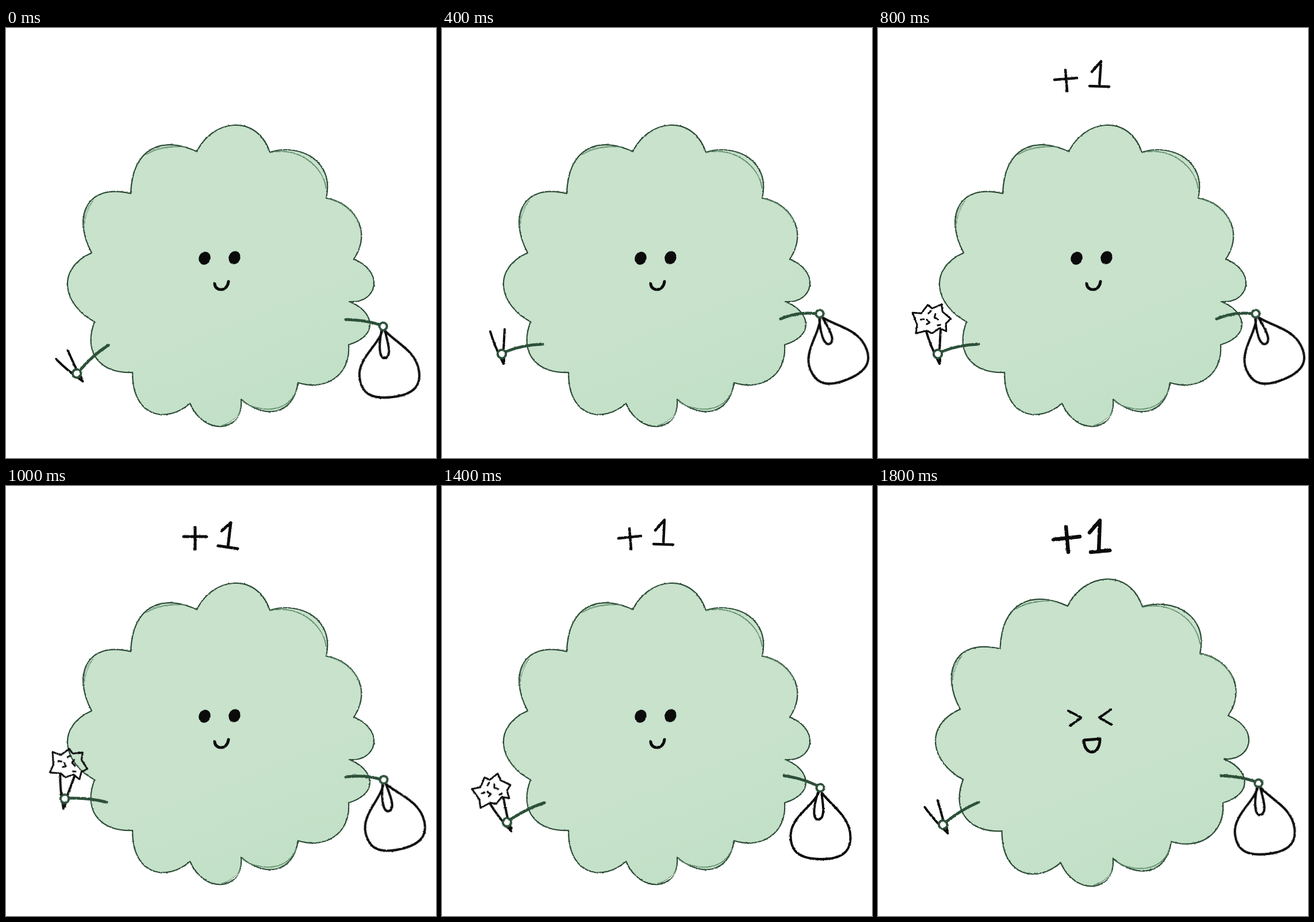
Animation of 748x748 px, one loop 2000 ms. Source, as an HTML page:

```html
<!DOCTYPE html>
<html lang="en">
<head>
<meta charset="utf-8">
<title>Plus one</title>
<style>
  html, body { margin: 0; width: 100%; height: 100%; overflow: hidden; background: #fff; }
  svg { display: block; width: 100vw; height: 100vh; }
  .ink { fill: none; stroke: #0b0b0b; stroke-width: 4; stroke-linecap: round; stroke-linejoin: round; }
  .arm { fill: none; stroke: #2c5039; stroke-width: 5; stroke-linecap: round; }
  .ring { fill: #fff; stroke: #2c5039; stroke-width: 4; }
  .inner { fill: none; stroke: #5d8768; stroke-width: 1.6; }
  .gap { fill: #fff; stroke: #5d8768; stroke-width: 1; }
</style>
</head>
<body>
<svg viewBox="0 0 748 748">
  <defs>
    <filter id="rough" filterUnits="userSpaceOnUse" x="0" y="0" width="748" height="748" color-interpolation-filters="sRGB">
      <feTurbulence type="fractalNoise" baseFrequency=".28" numOctaves="2" seed="4"/>
      <feDisplacementMap in="SourceGraphic" scale="2.4" xChannelSelector="R" yChannelSelector="G"/>
    </filter>
    <linearGradient id="leaf" x1=".3" y1="0" x2=".7" y2="1">
      <stop offset=".6" stop-color="#c8e2cc"/>
      <stop offset="1" stop-color="#c1e0c6"/>
    </linearGradient>
  </defs>

  <g filter="url(#rough)">
    <g id="body">
      <path fill="url(#leaf)" stroke="#2b4a35" stroke-width="2.2" stroke-linejoin="round" d="M332,215
        C358,160 435,147 459,216 C510,200 572,230 557,296 C600,302 640,350 605,402
        C660,425 645,480 597,476 C640,492 650,535 596,551 C600,605 555,632 508,617
        C500,674 450,681 409,646 C414,704 345,711 320,653 C282,687 220,681 220,599
        C170,602 132,570 154,511 C100,482 85,420 149,391 C116,330 138,269 217,288
        C220,205 275,188 332,215Z"/>
      <path class="gap" d="M244,220 Q266,203 312,207 Q272,204 244,220Z
        M135,346 Q134,318 152,300 Q138,320 135,346Z M408,666 Q402,688 374,692 Q400,684 408,666Z"/>
      <path class="inner" d="M459,217 C508,205 552,240 557,280 M412,650 C445,671 492,668 505,630 M560,297 Q598,306 614,340"/>
    </g>

    <g id="calm">
      <ellipse cx="345.5" cy="400.5" rx="10" ry="11.5" transform="rotate(22 345.5 400.5)" fill="#0b0b0b"/>
      <ellipse cx="397.5" cy="399.5" rx="10" ry="11.5" transform="rotate(22 397.5 399.5)" fill="#0b0b0b"/>
      <path class="ink" style="stroke-width:5" d="M363,445 C364,459 385,459 387,441"/>
    </g>
    <path id="squint" class="ink" d="M331,391 L354,403 L334,417 M405,389 L385,403 L406,415"/>
    <ellipse id="gasp" class="ink" cx="373" cy="447" rx="8.5" ry="10.5"/>
    <path id="laugh" class="ink" style="stroke-width:5" d="M358,442 L386,440 C386,470 359,470 358,442Z"/>

    <path id="score" class="ink"/>

    <path id="armL" class="arm"/>
    <g id="handL">
      <path class="ink" d="M-20,-39 Q-13,-14 3,17 M5,-43 L3,-8 L4,13"/>
      <g id="flower" transform="rotate(15)">
        <g transform="translate(-113 -585)">
          <path class="ink" style="stroke-width:3" d="M52,527 L67,524 L74,507 L83,511 L97,500 L102,512
            L119,520 L113,530 L117,543 L104,541 L94,553 L84,551 L67,560 L65,545Z"/>
          <path class="ink" style="stroke-width:3" d="M82,516 L79,521 M91,519 L91,525 L98,527
            M69,535 L74,533 M79,532 L85,536 L81,540 M100,537 L104,535"/>
        </g>
      </g>
      <circle class="ring" r="7.2"/>
    </g>

    <path id="armR" class="arm"/>
    <g id="handR">
      <path class="ink" d="M-3,9 C-13,32 -51.5,51 -51.5,83 C-51.5,110 -38,124 2,124 C38,124 52.5,111 52.5,86
        C52.5,50 20,32 3,9 M-4,8 C-14,40 -12,56 -3,55 C8,53 6,35 2,8"/>
      <circle class="ring" r="6.6"/>
    </g>
  </g>
</svg>
<script>
  const $ = id => document.getElementById(id);
  const STEP = 200;

  // Arm poses: hand x, hand y, tilt, arm curve
  const left = {
    low:  [123, 601, -28, "M178,552 Q152,568 129,595"],
    mid:  [110.5, 586, -17, "M174,550 Q142,560 116,581"],
    up:   [104, 567, 0,   "M175,550 Q140,551 111,563"],
    high: [102, 544, 17,  "M175,550 Q145,542 109,543"],
    back: [113, 585, -15, "M178,551 Q150,560 119,580"],
    wave: [113, 589, -19, "M175,550 Q143,564 119,584"]
  };
  const right = {
    hang:  [656, 519, -7,  "M591,507 Q625,508 650,516"],
    swing: [657, 508, -16, "M591,506 Q622,499 651,507"],
    top:   [657, 497, -22, "M589,506 Q620,493 651,497"],
    rest:  [662, 517, -7,  "M597,504 Q630,505 656,514"],
    lift:  [657, 511, -13, "M591,506 Q625,502 651,510"],
    drop:  [658, 525, 0,   "M595,504 Q625,508 652,521"]
  };
  const scores = {
    a: ["M307,90 L346,87 M326,73 L329,110 M372,76 L388,58 L385,101 M368,101 L402,102", 4.5],
    b: ["M309,88 L349,88 M329,72 L329,110 M375,78 L391,64 L386,106 M369,104 L403,109", 5],
    c: ["M307,91 L346,87 M326,74 L329,110 M371,77 L387,59 L385,101 M368,101 L402,102", 4.5],
    d: ["M305,93 L351,88 M327,71 L331,115 M368,81 L386,60 L384,114 M370,115 L403,112", 6.5]
  };

  // left arm, right arm, score, face; a flower comes with scores a to c
  const beats = [
    ["low", "hang", "", "calm"],
    ["mid", "swing", "", "calm"],
    ["up", "top", "", "calm"],
    ["up", "rest", "", "calm"],
    ["up", "top", "a", "calm"],
    ["high", "lift", "b", "calm"],
    ["up", "hang", "a", "calm"],
    ["back", "drop", "c", "calm"],
    ["up", "rest", "d", "gasp"],
    ["wave", "rest", "d", "laugh"]
  ];

  const show = (id, on) => $(id).setAttribute("visibility", on ? "visible" : "hidden");

  function pose(side, [x, y, tilt, curve]) {
    $("arm" + side).setAttribute("d", curve);
    $("hand" + side).setAttribute("transform", `translate(${x} ${y}) rotate(${tilt})`);
  }

  function draw([l, r, score, face]) {
    pose("L", left[l]);
    pose("R", right[r]);
    for (const id of ["calm", "gasp", "laugh"]) show(id, id === face);
    show("squint", face !== "calm");
    show("flower", score && score !== "d");
    show("score", score);
    if (score) {
      $("score").setAttribute("d", scores[score][0]);
      $("score").style.strokeWidth = scores[score][1];
    }
    $("body").setAttribute("transform", face === "calm" ? "" : "matrix(1.0225 0 0 1.019 -9.4 -10.2)");
  }

  let last = -1;
  function tick() {
    const i = Math.floor(performance.now() / STEP) % beats.length;
    if (i !== last) draw(beats[last = i]);
    requestAnimationFrame(tick);
  }
  tick();
</script>
</body>
</html>
```
